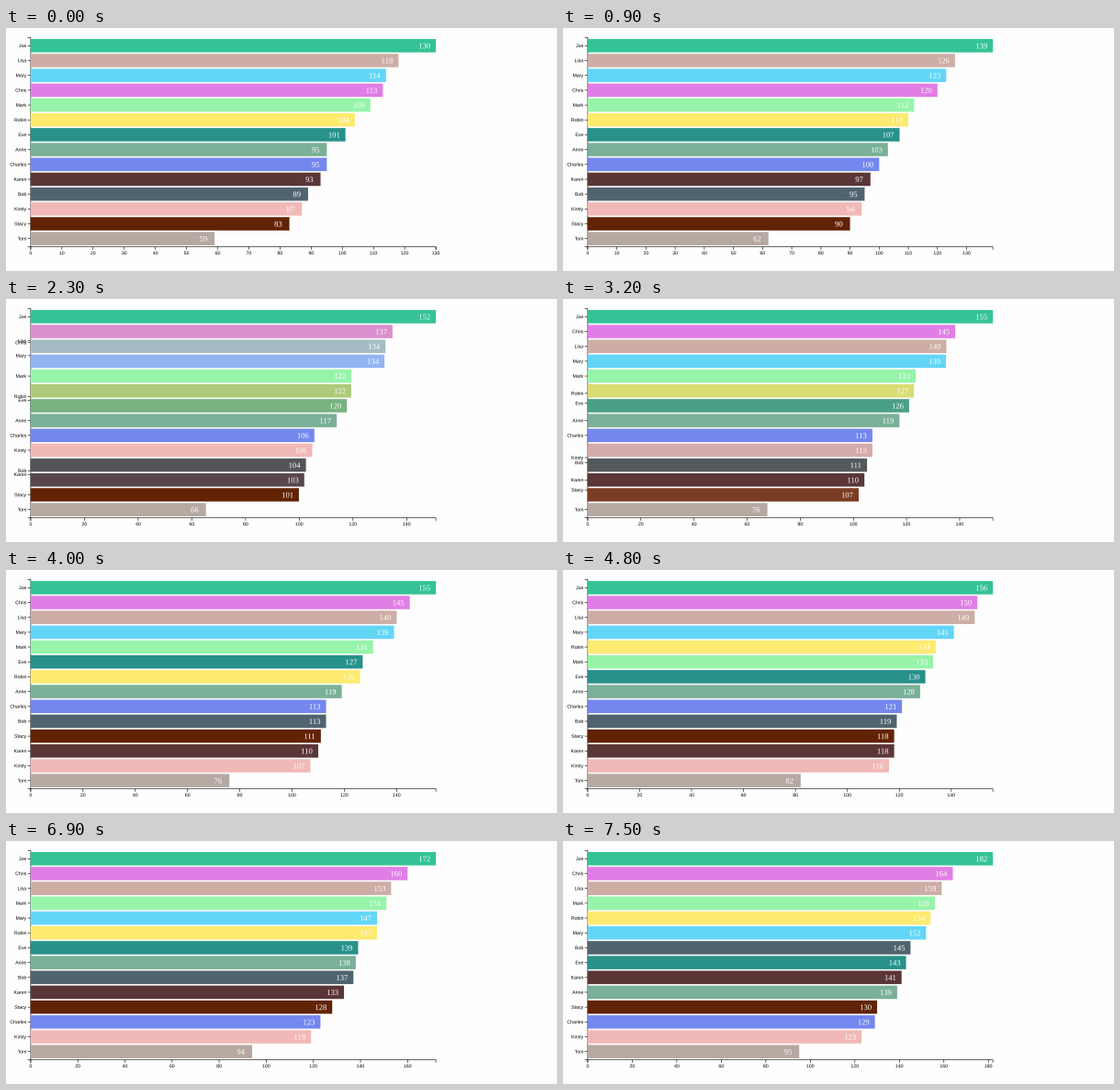
Animation of 600x265 px, one loop 7600 ms. Source, as a matplotlib script:

```python
import numpy as np
import matplotlib.pyplot as plt
from matplotlib.animation import FuncAnimation
from matplotlib.colors import to_rgb
from matplotlib.patches import PathPatch, Rectangle
from matplotlib.path import Path
from matplotlib.textpath import TextPath
from matplotlib.transforms import Affine2D

W, H, DPI = 600, 265, 100
FRAMES, STEP_MS = 76, 100
FIRST, PERIOD, DURATION = 27, 1000, 500  # update timing in ms

LEFT, WIDTH = 26.9, 441.2
TOP, BOTTOM = 10.4, 238.6
TICK = 3.2
LINE = 0.6 * 72 / DPI

# name: (colour, score after each update); the order settles ties
PLAYERS = {
    "Joe": ("#34c397", [130, 139, 149, 152, 155, 156, 163, 172, 182]),
    "Chris": ("#e07ee6", [113, 120, 128, 137, 145, 150, 157, 160, 164]),
    "Lisa": ("#cdada5", [118, 126, 131, 134, 140, 149, 150, 153, 159]),
    "Mary": ("#63d6f7", [114, 123, 129, 134, 139, 141, 145, 147, 152]),
    "Mark": ("#97f4a9", [109, 112, 115, 122, 131, 133, 142, 151, 156]),
    "Robin": ("#fdea6f", [104, 110, 114, 122, 126, 134, 137, 147, 154]),
    "Eve": ("#27918a", [101, 107, 115, 120, 127, 130, 132, 139, 143]),
    "Anne": ("#7ab098", [95, 103, 109, 117, 119, 128, 137, 138, 139]),
    "Charles": ("#7487ee", [95, 100, 105, 106, 113, 121, 122, 123, 129]),
    "Kirsty": ("#f0b9b7", [87, 94, 103, 106, 107, 116, 118, 119, 123]),
    "Stacy": ("#622304", [83, 90, 98, 101, 111, 118, 119, 128, 130]),
    "Karen": ("#5b3636", [93, 97, 100, 103, 110, 118, 124, 133, 141]),
    "Bob": ("#50646f", [89, 95, 100, 104, 113, 119, 129, 137, 145]),
    "Tom": ("#b5a9a1", [59, 62, 64, 66, 76, 82, 86, 94, 95]),
}
# on a tie for ninth place Charles stays ahead of Bob through dict order
N = len(PLAYERS)
STATES = len(PLAYERS["Joe"][1])
PITCH = (BOTTOM - TOP) / (N + 0.1)
BAND = 0.9 * PITCH


def slot_y(slot):
    return TOP + 0.1 * PITCH + slot * PITCH + BAND / 2


def ranking(state):
    return sorted(PLAYERS, key=lambda name: -PLAYERS[name][1][state])


RANKS = [ranking(s) for s in range(STATES)]


def score(state, slot):
    return PLAYERS[RANKS[state][slot]][1][state]


def color(state, slot):
    return np.array(to_rgb(PLAYERS[RANKS[state][slot]][0]))


def top_score(state):
    return score(state, 0)


def has_tick(state, value):
    step = 20 if top_score(state) > 141.4 else 10
    return value % step == 0 and value <= top_score(state)


def mix(a, b, p):
    return a + (b - a) * p


def ease(t):
    return 4 * t ** 3 if t < 0.5 else 1 - 4 * (1 - t) ** 3


def progress(ms):
    """Return the previous state, the next state and the eased progress."""
    if ms < FIRST:
        return 0, 0, 1.0
    k = min(int((ms - FIRST) // PERIOD), STATES - 2)
    t = min((ms - FIRST - k * PERIOD) / DURATION, 1)
    return k, k + 1, ease(t)


glyphs = {}


def text_path(text, family, size, anchor):
    """Outline of a text with its baseline at y = 0, y pointing down."""
    key = (text, family, size, anchor)
    if key not in glyphs:
        path = TextPath((0, 0), text, size=size, prop={"family": family})
        box = path.get_extents()
        shift = box.x1 if anchor == "right" else (box.x0 + box.x1) / 2
        glyphs[key] = Path((path.vertices - [shift, 0]) * [1, -1], path.codes)
    return glyphs[key]


fig = plt.figure(figsize=(W / DPI, H / DPI), dpi=DPI, facecolor="#fefefe")
ax = fig.add_axes([0, 0, 1, 1])
ax.set_xlim(0, W)
ax.set_ylim(H, 0)
ax.axis("off")


def add_line(xs, ys):
    line, = ax.plot(xs, ys, color="black", lw=LINE, zorder=1,
                    solid_capstyle="butt", solid_joinstyle="miter")
    line.set_snap(False)
    return line


def add_text(path, fill):
    patch = PathPatch(path, fc=fill, lw=0, zorder=3)
    ax.add_patch(patch)
    return patch


def place(patch, x, y):
    patch.set_transform(Affine2D().translate(x, y) + ax.transData)


add_line([LEFT - TICK, LEFT, LEFT, LEFT - TICK], [TOP, TOP, BOTTOM, BOTTOM])
add_line([LEFT, LEFT, LEFT + WIDTH, LEFT + WIDTH],
         [BOTTOM + TICK, BOTTOM, BOTTOM, BOTTOM + TICK])

bars, labels = [], []
for slot in range(N):
    bar = Rectangle((LEFT - 0.2, slot_y(slot) - BAND / 2), 1, BAND,
                    lw=0, zorder=2, snap=False)
    ax.add_patch(bar)
    bars.append(bar)
    labels.append(add_text(text_path("0", "Liberation Serif", 8.6, "middle"),
                           "white"))

names = {name: (add_line([LEFT - TICK, LEFT], [0, 0]),
                add_text(text_path(name, "Liberation Sans", 5.2, "right"),
                         "black"))
         for name in PLAYERS}

ticks = {v: (add_line([0, 0], [BOTTOM, BOTTOM + TICK]),
             add_text(text_path(str(v), "Liberation Sans", 5.2, "middle"),
                      "black"))
         for v in range(0, 190, 10)}


def update(frame):
    old, new, p = progress(frame * STEP_MS)
    unit_old, unit_new = WIDTH / top_score(old), WIDTH / top_score(new)

    for slot in range(N):
        width = mix(score(old, slot) * unit_old, score(new, slot) * unit_new, p)
        bars[slot].set_width(width + 0.2)
        bars[slot].set_facecolor(mix(color(old, slot), color(new, slot), p))
        labels[slot].set_path(text_path(str(score(new, slot)),
                                        "Liberation Serif", 8.6, "middle"))
        place(labels[slot], LEFT + width - 12.2, slot_y(slot) + 3)

    for name, (line, text) in names.items():
        y = slot_y(mix(RANKS[old].index(name), RANKS[new].index(name), p))
        line.set_ydata([y, y])
        place(text, LEFT - 4.8, y + 1.75)

    for value, (line, text) in ticks.items():
        x = LEFT + value * mix(unit_old, unit_new, p)
        alpha = mix(float(has_tick(old, value)), float(has_tick(new, value)), p)
        line.set_xdata([x, x])
        place(text, x, BOTTOM + 8.5)
        line.set_alpha(alpha)
        text.set_alpha(alpha)


anim = FuncAnimation(fig, update, frames=FRAMES, interval=STEP_MS,
                     init_func=lambda: update(0), repeat=True, repeat_delay=0)
plt.show()
```
